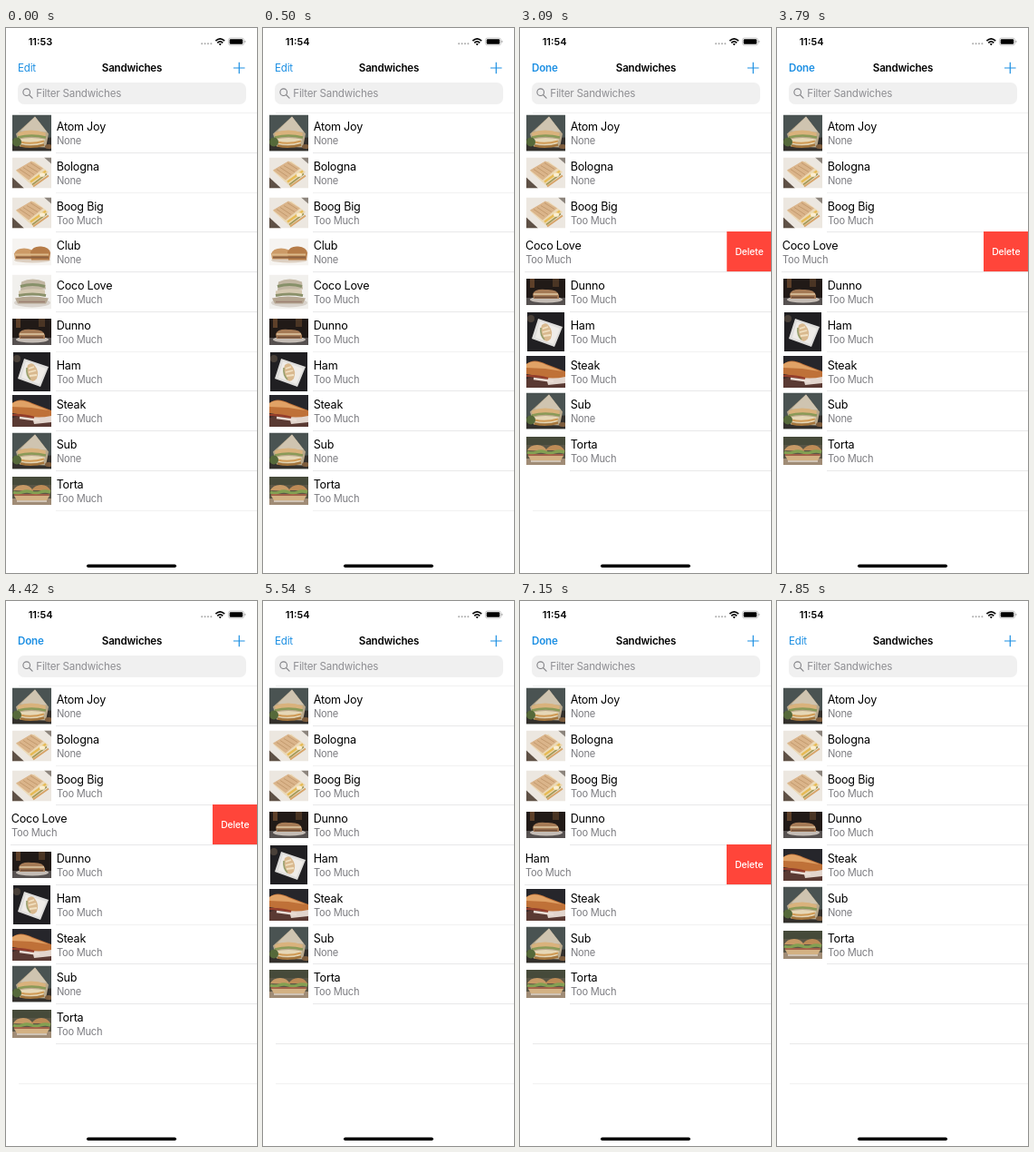
Recreate the animation shown at these times as an HTML page. Size 277 by 600 pixels, loop 8 s.

```html
<!DOCTYPE html>
<html lang="en">
<head>
<meta charset="utf-8">
<title>Sandwiches</title>
<style>
  html, body { margin: 0; width: 100%; height: 100%; overflow: hidden; background: #fff; }
  svg { display: block; }
  text { font: 12.56px Inter, "Liberation Sans", sans-serif; letter-spacing: -.2px; }
  .sub { font-size: 11.08px; letter-spacing: -.24px; fill: #7c7c80; }
  .bar { font-size: 11.6px; }
  .bold { font-weight: 600; }
  .blue { fill: #1c8fe3; }
  .del { font-size: 10.4px; font-weight: 500; letter-spacing: -.1px; fill: #fff; text-anchor: middle; }
</style>
</head>
<body>
<svg id="stage" width="277" height="600" viewBox="0 0 277 600">
  <rect width="277" height="600" fill="#fff"/>
  <text id="clock" class="bold" x="24.7" y="19" style="font-size:11px;letter-spacing:0"></text>
  <path d="M216.2 17.3h12" stroke="#aaa" stroke-width="2" stroke-linecap="round" stroke-dasharray="0 3.4"/>
  <path d="M231.4 14.1q4.9-4.6 9.8 0M233.3 16.3q3-2.7 6 0" fill="none" stroke="#000" stroke-width="1.7"/>
  <path d="M234.7 17.6q1.6-1.3 3.2 0l-1.6 1.7z"/>
  <rect x="245.4" y="11" width="17.2" height="8" rx="2.4" fill="none" stroke="#b4b4b4" stroke-width=".7"/>
  <rect x="246.7" y="12.3" width="14.6" height="5.4" rx="1.3"/>
  <rect x="263.3" y="13.7" width="1" height="2.6" rx=".5" fill="#aaa"/>

  <text id="edit" class="bar blue" x="13" y="48.2"></text>
  <text class="bar bold" x="139" y="48.2" text-anchor="middle">Sandwiches</text>
  <path d="M251 44h12.6M257.3 37.7v12.6" stroke="#1c8fe3" stroke-width="1.2"/>

  <rect x="13" y="60" width="252" height="24" rx="7" fill="#f0f0f0"/>
  <g fill="none" stroke="#828286" stroke-width="1.1">
    <circle cx="22.7" cy="70.7" r="3.8"/><path d="M25.5 73.5l3.6 3.6" stroke-linecap="round"/>
  </g>
  <text class="bar" x="33.3" y="75.8" fill="#8e8e92">Filter Sandwiches</text>

  <g id="list"></g>
  <rect x="89" y="590.4" width="99" height="3.7" rx="1.8"/>
</svg>
<script>
const $ = id => document.getElementById(id);
const rect = (x, y, w, h, fill, more = '') =>
  `<rect x="${x}" y="${y}" width="${w}" height="${h}" fill="${fill}" ${more}/>`;
const path = (d, fill) => `<path d="${d}" fill="${fill}"/>`;
const oval = (cx, cy, rx, ry, fill) => `<ellipse cx="${cx}" cy="${cy}" rx="${rx}" ry="${ry}" fill="${fill}"/>`;
const line = (d, color, w) => `<path d="${d}" fill="none" stroke="${color}" stroke-width="${w}"/>`;

// Thumbnails: height and flat shapes on a 43px wide picture
const wrap = [40,
  rect(0, 0, 43, 40, '#4a5352') + path('M0 27l43-2v15H0z', '#33302c') +
  path('M4 21L25 2l15 19-3 15-29-1z', '#b9a98c') + path('M9 18L25 2l13 17z', '#cfc4b0') +
  path('M6 20q14-6 31 0l-1 5q-15-3-29 1z', '#d9b27c') + line('M6 25q15-4 31 0', '#8a9a58', 2.5) +
  path('M7 27q14-3 29 0l-2 5q-13 3-25 0z', '#e6d7b6') + line('M9 30q12 3 26-1', '#cf9a55', 2) +
  line('M9 34q13 3 26-1', '#a5763c', 2.5) + oval(5, 30, 5, 5, '#55693a') + oval(40, 35, 4, 2.5, '#7d5c3c')];
const toast = [34,
  rect(0, 0, 43, 34, '#ece7e0') + path('M0 22l13 12H0z', '#5f5146') + path('M35 0h8v7z', '#8c847c') +
  path('M4 15L24 4l16 12-17 16z', '#ecd9b6') + path('M4 14L21 4l13 8-16 13z', '#dab48a') +
  line('M8 13l12 8M12 11l12 8M16 9l12 7M20 6l11 7', '#bd9368', .8) +
  line('M20 27l17-12', '#e6bb55', 2.5) + line('M22 30l16-12', '#a39a5a', 1.6) +
  line('M23 32l17-12', '#d7a468', 2) + oval(33, 19, 3, 2.3, '#fbeed0')];
const club = [30,
  rect(0, 0, 43, 30, '#f6f4f1') + oval(22, 24, 20, 3, '#ddd0c2') +
  path('M2 17q2-6 11-6t12 6v6H3z', '#cc9a66') + path('M20 15q3-7 12-6t10 7l-1 8H21z', '#b67c48') +
  line('M3 18h37', '#dcb98a', 2) + line('M4 21h36', '#8c6140', 1.8)];
const coco = [38,
  rect(0, 0, 43, 38, '#f1f0ed') + oval(22, 31, 20, 5, '#d8d2cb') +
  path('M10 8q12-6 26 0l1 8-28 2z', '#c2b7a3') + line('M9 13q13-4 27 0', '#87916a', 3) +
  path('M7 18q14-4 29-1v5H7z', '#d6cab2') + line('M7 23q15-3 30 0', '#8a9069', 3) +
  path('M3 26q17-4 37 0l-3 6H6z', '#b5a691') + line('M7 30h29', '#9c8072', 1.6)];
const dunno = [29,
  rect(0, 0, 43, 29, '#211a17') + rect(0, 21, 43, 8, '#565150') + rect(4, 0, 5, 10, '#5e4029') +
  rect(29, 0, 7, 9, '#4a3524') + oval(22, 23, 18, 3.5, '#c4bcb5') +
  path('M7 17q2-6 14-5 13-1 15 6v4H8z', '#a57a55') + line('M8 17h27', '#d5bd98', 1.8) + line('M9 20.5h25', '#70503c', 1.8)];
const ham = [43,
  rect(1, 0, 41, 43, '#201f22') + path('M13 7l27 9-9 22L6 29z', '#dfdedc') + path('M15 10l22 8-7 17-20-7z', '#efece8') +
  path('M17 14q5-4 8 1 5 6 2 14-4 5-8 1-5-8-2-16z', '#d9b98f') + line('M18 18l6-2M18 22l8-2M19 26l8-1', '#f2e2c4', 1.8) +
  line('M16 17q-1 8 4 13', '#98a06e', 1.6) + oval(5, 7, 4, 4, '#494039')];
const steak = [35,
  rect(0, 0, 43, 35, '#26262b') + path('M0 25l20-5 23 4v11H0z', '#5a3a33') + path('M22 24l21-5v11l-19 2z', '#e2d5cd') +
  path('M0 9Q8 2 22 9l21 8v6q-15 3-25 0L0 20z', '#bf7138') + path('M0 9Q8 3 22 10l18 7-19-3L0 13z', '#e0a266') +
  line('M0 22q15 0 24 3', '#963f2c', 2.5) + line('M8 25l22 3', '#eaddd5', 2.5)];
const torta = [31,
  rect(0, 0, 43, 31, '#5a5646') + rect(0, 0, 43, 9, '#464a3a') + path('M0 24h43v7H0z', '#a08c76') +
  path('M1 15q3-6 11-6t11 7z', '#c79a66') + path('M21 15q4-6 11-6t10 6z', '#bd8b56') +
  line('M1 17q5 2 10 0t10 0 10 0 11 0', '#83a052', 3.5) + line('M2 20h39', '#b8654a', 1.6) +
  path('M2 21h39l-3 5H5z', '#d3b183') + line('M5 27h33', '#e0d6c8', 1.5)];

const never = 1e9;
// [name, mood, thumbnail, swiped at, deleted at, time to delete]
const rows = [
  ['Atom Joy', 'None', wrap],
  ['Bologna', 'None', toast],
  ['Boog Big', 'Too Much', toast],
  ['Club', 'None', club, never, 2460, 0],
  ['Coco Love', 'Too Much', coco, 2900, 4880, 290],
  ['Dunno', 'Too Much', dunno],
  ['Ham', 'Too Much', ham, 5790, 7170, 290],
  ['Steak', 'Too Much', steak],
  ['Sub', 'None', wrap],
  ['Torta', 'Too Much', torta],
].map(([name, mood, pic, swipe = never, gone = never, span = 0]) => ({ name, mood, pic, swipe, gone, span }));

const slotY = slot => Math.round(93.2 + 43.75 * slot);
const shade = slot => slot === 0 || slot % 4 === 2 ? '#f1f1f1' : '#e8e8e9';

let html = '';
for (let i = 0; i <= 10; i++) html += rect(14, slotY(i), 263, 1, shade(i));
for (const { name, mood, pic: [h, art] } of rows) {
  html += `<g class="row">${rect(0, 1, 277, 44, '#fff', 'class="back"')}${rect(55, 0, 222, 1, '#fff', 'class="rule"')}
    <g class="body">
      <svg x="7" y="${22.5 - h / 2}" width="43" height="${h}">${art}</svg>
      <text x="55.7" y="20">${name}</text><text class="sub" x="56" y="35">${mood}</text>
    </g>
    <g class="action">${rect(0, 0, 277, 44, '#ff453a')}<text class="del" x="24.8" y="25.7">Delete</text></g></g>`;
}
$('list').innerHTML = html;
document.querySelectorAll('.row').forEach((g, i) => {
  const [back, rule, body, action] = ['.back', '.rule', '.body', '.action'].map(s => g.querySelector(s));
  Object.assign(rows[i], { g, back, rule, body, action });
});

const clamp = x => Math.max(0, Math.min(1, x));
const easeOut = x => 1 - (1 - x) ** 3;
const smooth = x => x * x * (3 - 2 * x);
const move = (el, x, y) => el.setAttribute('transform', `translate(${x} ${y})`);

function draw(t) {
  let shift = 0, editing = false;
  rows.forEach((r, i) => {
    const slot = i - shift, y = slotY(slot), height = slotY(slot + 1) - y;
    const open = easeOut(clamp((t - r.swipe) / 230));
    const gone = r.span ? smooth(clamp((t - r.gone) / r.span)) : +(t >= r.gone);
    const off = 50 * open + 227 * gone;
    r.g.style.display = gone < 1 ? '' : 'none';
    move(r.g, 0, y);
    move(r.body, -off, 0);
    move(r.action, Math.min(277, 278 - off), 0);
    r.action.style.display = off > 1 ? '' : 'none';
    r.back.setAttribute('height', height);
    r.rule.setAttribute('x', Math.max(0, 55 - off));
    r.rule.setAttribute('width', 277);
    r.rule.setAttribute('y', height);
    r.rule.setAttribute('fill', shade(Math.round(slot + 1)));
    if (open > .3 && gone < 1) editing = true;
    shift += gone;
  });
  $('clock').textContent = t < 500 ? '11:53' : '11:54';
  $('edit').textContent = editing ? 'Done' : 'Edit';
  $('edit').classList.toggle('bold', editing);
}

function tick() {
  draw(performance.now() % 8000);
  requestAnimationFrame(tick);
}
tick();
</script>
</body>
</html>
```
